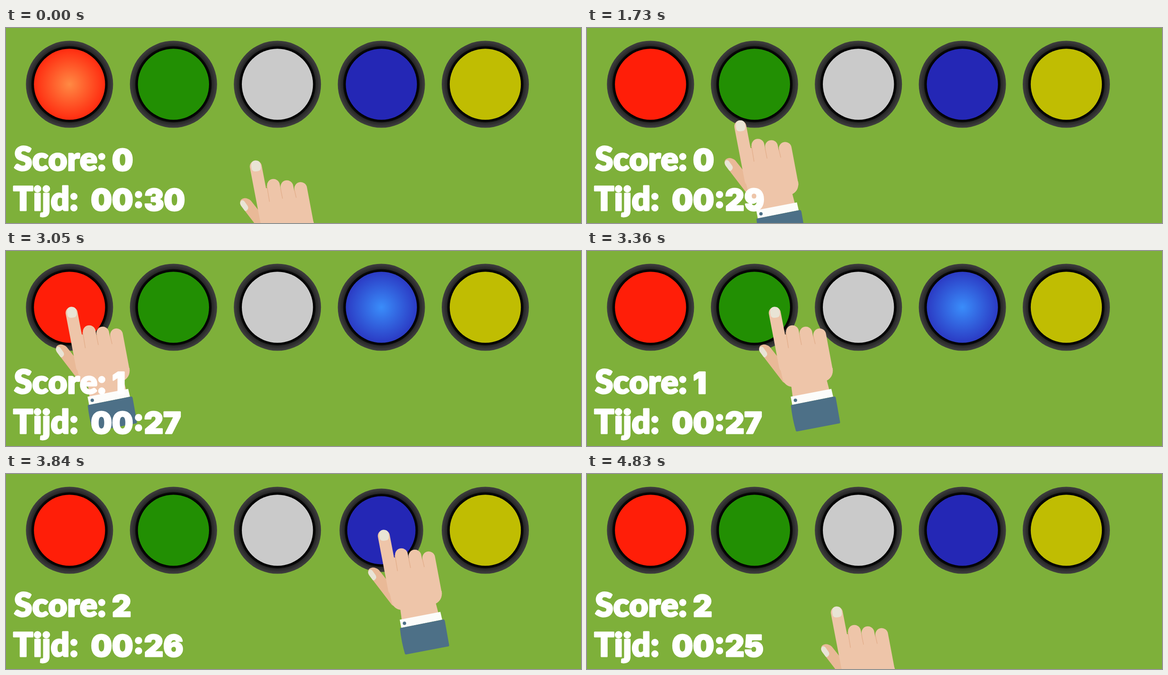
An HTML page with a canvas for the animation above (4.96 s loop, 1280x435 px).

```html
<!DOCTYPE html>
<html lang="nl">
<head>
<meta charset="utf-8">
<title>Reactiespel</title>
<style>
  html, body { margin: 0; width: 100%; height: 100%; overflow: hidden; background: #7eb03a; }
  canvas { display: block; }
</style>
</head>
<body>
<canvas id="stage" width="1280" height="435"></canvas>
<script>
const ctx = document.getElementById('stage').getContext('2d');
const LOOP = 4960, STEP = 30;

// lit and pressed hold [from, to] times in ms
const buttons = [
  { color: '#ff1e08', glow: ['#ff8a44', '#ff2c10'], lit: [[0, 570], [1030, 1580]], pressed: [2060, 2290] },
  { color: '#228f03', glow: ['#80b76c', '#2f981a'], lit: [[4070, 4620]] },
  { color: '#cacaca' },
  { color: '#2427b5', glow: ['#3a8dfa', '#2b3bc4'], lit: [[2060, 2590], [3050, 3600]], pressed: [3840, 4070] },
  { color: '#c0bd02' }
];

const rest = [-103, 171], atRed = [-513, 0], atBlue = [182, 0];
const moves = [
  { start: 1400, end: 2030, from: rest, to: atRed },
  { start: 3090, end: 3780, from: atRed, to: atBlue },
  { start: 4440, end: 4830, from: atBlue, to: rest }
];
const ticks = [1000, 1970, 2920, 3810, 4830];
const hits = [2060, 3840];

const labelFont = '900 73px Lato, "Open Sans", sans-serif';
const digitFont = '900 66px Inter, Roboto, sans-serif';

const within = (t, [from, to]) => t >= from && t < to;
const passed = (t, times) => times.filter(at => t >= at).length;

function handOffset(t) {
  let pos = rest;
  for (const { start, end, from, to } of moves) {
    if (t < start) break;
    const stepped = Math.floor((t - start) / STEP) * STEP;
    const p = Math.min(1, stepped / (end - start));
    pos = from.map((v, i) => v + (to[i] - v) * p);
  }
  return pos;
}

function disc(x, y, r, fill) {
  ctx.fillStyle = fill;
  ctx.beginPath();
  ctx.arc(x, y, r, 0, 7);
  ctx.fill();
}

function radial(r0, r1, inner, outer) {
  const g = ctx.createRadialGradient(0, 0, r0, 0, 0, r1);
  g.addColorStop(0, inner);
  g.addColorStop(1, outer);
  return g;
}

function drawButton(b, i, t) {
  const lit = b.lit && b.lit.some(span => within(t, span));
  const scale = b.pressed && within(t, b.pressed) ? 0.96 : 1;
  ctx.save();
  ctx.translate(141.4 + i * 231.4, 125.5);
  ctx.scale(scale, scale);
  disc(0, 0, 97, radial(83, 95, '#202020', '#3c3c3c'));
  disc(0, 0, 85, radial(79, 85, '#000', '#0a0a0a'));
  disc(0, 0, 79.2, lit ? radial(0, 79.2, ...b.glow) : b.color);
  ctx.restore();
}

function shape(d, fill) {
  ctx.fillStyle = fill;
  ctx.fill(new Path2D(d));
}

function line(x1, y1, x2, y2, width, color) {
  ctx.strokeStyle = color;
  ctx.lineWidth = width;
  ctx.lineCap = 'round';
  ctx.beginPath();
  ctx.moveTo(x1, y1);
  ctx.lineTo(x2, y2);
  ctx.stroke();
}

function drawHand([dx, dy]) {
  const skin = '#eec5a9', shade = '#e9b997', crease = '#e4b18f';
  const nail = '#e9e4d5', sleeve = '#4d7087';
  ctx.save();
  ctx.translate(dx, dy);

  shape('M634 208.5Q624 210 624 218Q624 223 628 228L677 292L692 302L676 250L667 238L648 214Q642 208.5 634 208.5Z', shade);
  shape('M627 214Q631 212 634 216L641 226Q644 231 640 235Q637 239 634 236L626 225Q622 218 627 214Z', nail);

  line(659, 138, 682, 258, 26.6, skin);
  line(698.3, 180, 713, 255, 28.4, skin);
  line(728.3, 183, 743, 255, 28.4, skin);
  line(759, 187, 774, 267, 28.4, skin);
  shape('M681 186L716 190L746 192L788 262Q790 281 775 289L781 312L699 326L696 303Q682 301 677 287L669 252Z', skin);
  line(684, 182, 689.5, 216, 1.6, crease);
  line(714.3, 188, 718.5, 209, 1.6, crease);
  line(745, 190, 749, 207, 1.6, crease);
  shape('M649 138Q648 125 658.5 124.6Q669 124.5 670 136Q672 147 664 148.3Q652 151 650 144Z', nail);

  shape('M694.5 325L785 307.5L789 325L698 343.5Z', '#fcfcfa');
  shape('M696 343.5L792 324.5Q794 324.5 795 328L804.5 382Q804.5 384 803 384.5L709 402.5Q707 403 706 401Q698 374 695 345Z', sleeve);
  disc(705, 333, 3.8, sleeve);
  ctx.restore();
}

function write(text, x, y, font) {
  ctx.font = font;
  ctx.fillText(text, x, y);
  ctx.strokeText(text, x, y);
}

function drawText(t) {
  ctx.fillStyle = ctx.strokeStyle = '#fff';
  ctx.lineWidth = 3;
  ctx.lineJoin = 'round';
  ctx.fontKerning = 'none';
  write('Score:', 18, 318, labelFont);
  write(passed(t, hits), 236, 318, digitFont);
  write('Tijd:', 16, 407, labelFont);
  write('00:' + (30 - passed(t, ticks)), 189, 407, digitFont);
}

function draw(t) {
  ctx.fillStyle = '#7eb03a';
  ctx.fillRect(0, 0, 1280, 435);
  buttons.forEach((b, i) => drawButton(b, i, t));
  drawHand(handOffset(t));
  drawText(t);
}

const begin = performance.now();
function frame() {
  draw((performance.now() - begin) % LOOP);
  requestAnimationFrame(frame);
}
frame();
</script>
</body>
</html>
```
